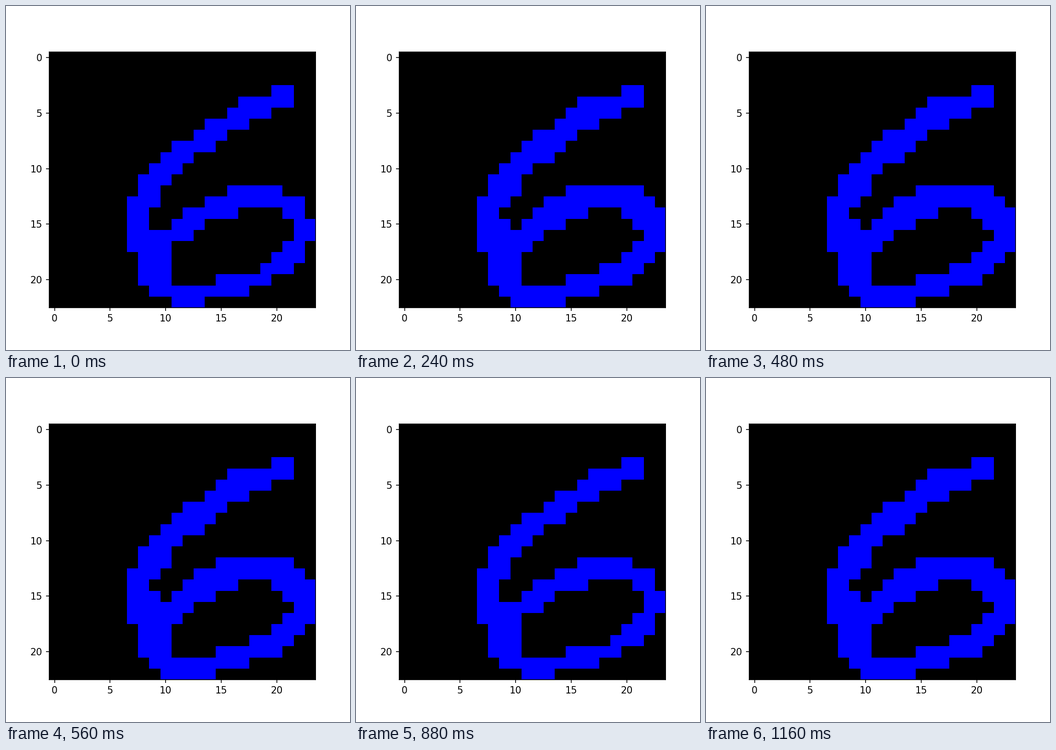
Write a matplotlib script that moves like this. It is 748 px wide and 748 px high and loops after 1200 ms.

```python
import numpy as np
import matplotlib.pyplot as plt
from matplotlib.animation import FuncAnimation

SIZE, DPI = 748, 149.6
FRAMES, INTERVAL = 30, 40
ROWS, COLS, TOP = 23, 24, 3

# Inclusive column runs of the digit's strokes, one entry per row from TOP down.
STROKES = [
    [(20, 21)], [(17, 21)], [(16, 19)], [(14, 17)], [(13, 15)], [(11, 14)],
    [(10, 12)], [(9, 11)], [(8, 10)],
    [(8, 9), (16, 20)], [(7, 9), (14, 22)], [(7, 8), (12, 16), (21, 22)],
    [(7, 8), (11, 13), (22, 23)], [(7, 12), (22, 23)], [(7, 10), (21, 22)],
    [(8, 10), (20, 22)], [(8, 10), (19, 21)], [(8, 10), (15, 19)],
    [(9, 17)], [(11, 13)],
]
# Cells that only the thicker digit has: row -> columns.
EXTRA = {
    4: [16], 5: [15], 7: [12], 9: [13], 12: [10, 15, 21], 13: [13],
    14: [20, 23], 15: [9, 14, 21], 17: [11, 23], 19: [18], 20: [20],
    22: [10, 14],
}


def blank():
    return np.zeros((ROWS, COLS), bool)


def draw_digit():
    grid = blank()
    for row, runs in enumerate(STROKES, TOP):
        for first, last in runs:
            grid[row, first:last + 1] = True
    return grid


def draw_extra():
    grid = blank()
    for row, cols in EXTRA.items():
        grid[row, cols] = True
    return grid


def to_blue(grid):
    rgb = np.zeros((ROWS, COLS, 3), np.uint8)
    rgb[grid, 2] = 255
    return rgb


digit, extra = draw_digit(), draw_extra()
thin, diff, thick = (to_blue(g) for g in (digit, extra, digit | extra))

# The difference flickers against the thick digit, then against the thin one.
sequence = [thin] + [diff, thick] * 7 + [diff, thin] * 7 + [thick]

fig, ax = plt.subplots(figsize=(SIZE / DPI, SIZE / DPI), dpi=DPI)
fig.subplots_adjust(left=0.125, right=0.9, bottom=0.11, top=0.88)
image = ax.imshow(sequence[0], interpolation="nearest")
ax.set_xticks(range(0, COLS, 5))
ax.set_yticks(range(0, ROWS, 5))


def update(frame):
    image.set_data(sequence[frame])
    return [image]


anim = FuncAnimation(fig, update, frames=FRAMES, interval=INTERVAL,
                     repeat=True, repeat_delay=0)
plt.show()
```
